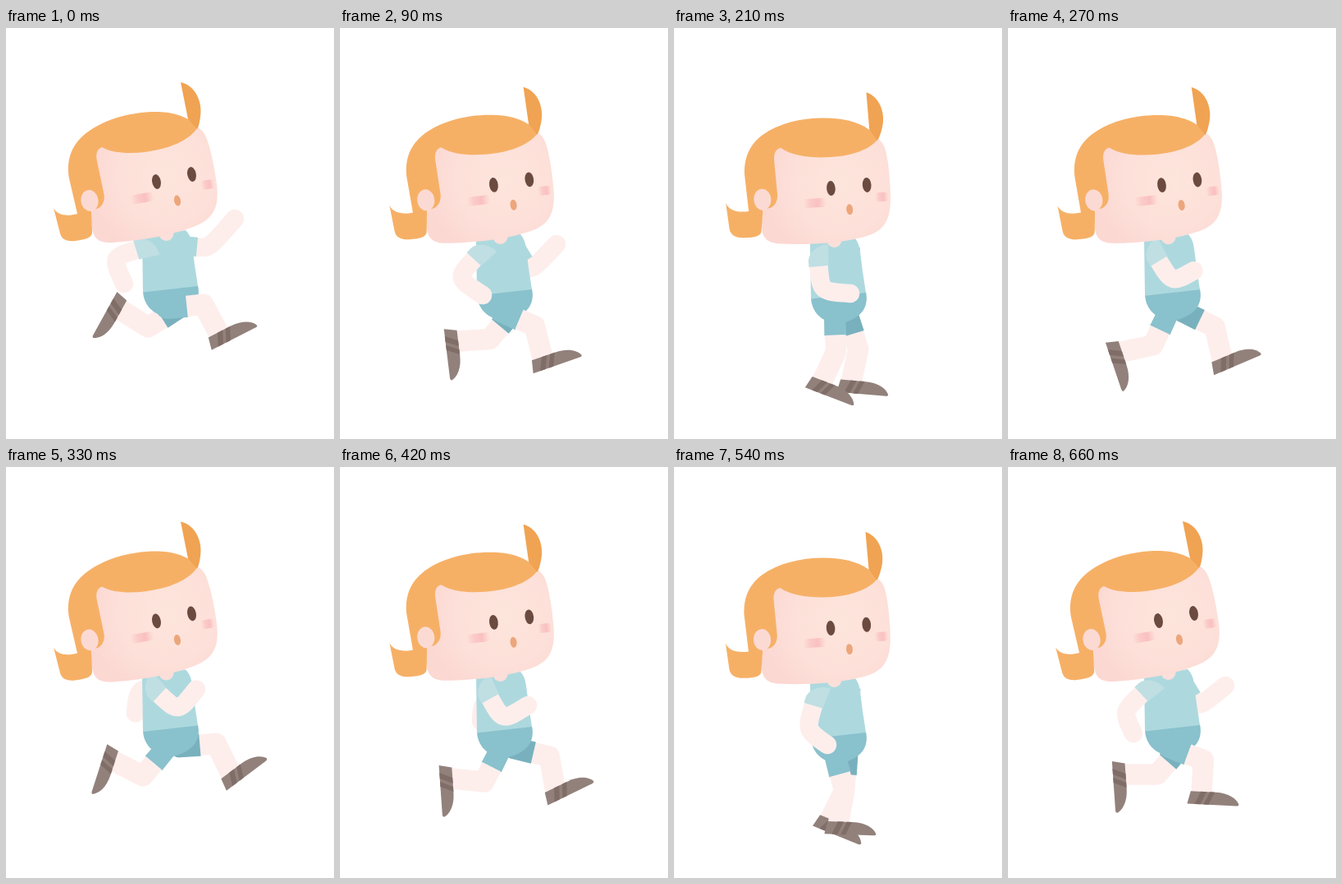
An HTML page for the animation above (0.69 s loop, 400 by 500 pixels).

```html
<!DOCTYPE html>
<html lang="en">
<head>
<meta charset="utf-8">
<title>Runner</title>
<style>
  html, body { margin: 0; width: 100%; height: 100%; overflow: hidden; background: #fff; }
  svg { display: block; width: 100vw; height: 100vh; }
  .limb { fill: none; stroke: #fdeeec; stroke-linejoin: round; }
  .leg { stroke-width: 25.5; }
  .arm { stroke-width: 22.5; stroke-linecap: round; }
</style>
</head>
<body>
<svg viewBox="0 0 400 500">
  <defs>
    <radialGradient id="skin" gradientUnits="userSpaceOnUse" cx="196" cy="180" r="96">
      <stop offset="0" stop-color="#fde5dc"/>
      <stop offset=".62" stop-color="#fde0d9"/>
      <stop offset="1" stop-color="#fcd8d3"/>
    </radialGradient>
    <linearGradient id="blush">
      <stop offset="0" stop-color="#fac3c3" stop-opacity="0"/>
      <stop offset=".3" stop-color="#fac3c3" stop-opacity=".75"/>
      <stop offset=".65" stop-color="#fac0c1"/>
      <stop offset="1" stop-color="#fac3c3" stop-opacity="0"/>
    </linearGradient>
    <g id="shoe">
      <path fill="#92817b" d="M-17 15L-13.500 -.5H17C33 -.5 43 6 46 13Q46 15 43 15Z"/>
      <path fill="#806d67" d="M-1 -.5H6L-1 15H-8ZM10 -.5H16L9 15H3Z"/>
    </g>
    <path id="cuff" d="M0 -13A13 13 0 0 0 0 13L25 13.500V-13.500Z"/>
  </defs>

  <g id="body">
    <path id="farArm" class="limb arm"/>
    <path id="farSleeve" fill="#add9de" d="M-6 -12H18V11.500H-6Z"/>

    <path id="farLeg" class="limb leg"/>
    <use id="farShoe" href="#shoe"/>
    <use id="farCuff" href="#cuff" fill="#78b1bd"/>

    <path fill="#89c1cd" d="M167 320L234 313C238 332 228 343 212 349C194 356 168 346 167 320Z"/>
    <path fill="#add9de" d="M166 253L219 246C225 252 226 258 227 264L230 288L234 314L167 321.500Z"/>
    <circle cx="195.500" cy="250" r="9" fill="#fbdfda"/>

    <use id="nearCuff" href="#cuff" fill="#89c1cd"/>
    <path id="nearLeg" class="limb leg"/>
    <use id="nearShoe" href="#shoe"/>

    <path id="nearArm" class="limb arm"/>
    <path id="nearSleeve" fill="#bfdfe3" d="M17 -12L-9 -14C-9 0 0 11 10 12H17Z"/>

    <g id="head">
      <path fill="url(#skin)" d="M104 235C105 256 112 262 130 261C160 259 200 253 228 242C250 234 261 222 257 190C254 168 250 150 246 138C243 128 238 122 232 120L106 140Z"/>
      <path fill="#f6b066" d="M234 120C220 106 200 102 183 102C150 102 115 112 93 132C77 147 74 165 77 183L87 226C73 230 62 227 58 219L66 250C68 258 76 260 84 259C100 257 106 254 105 247L104 222L113 219C119 215 121 208 119 200L111 162C109 153 111 147 117 145C135 155 165 153 190 147C210 142 228 132 234 120Z"/>
      <path fill="#f0a352" d="M213 66C232 70 240 92 237 108C236 115 235 120 233 123L222 111Z"/>
      <ellipse cx="102" cy="210" rx="10.500" ry="13" fill="#fcdad4" transform="rotate(-11 102 210)"/>
      <g fill="#6b4a40">
        <ellipse cx="183.500" cy="187" rx="5.300" ry="9" transform="rotate(-11 183.500 187)"/>
        <ellipse cx="226.500" cy="178" rx="5.300" ry="9" transform="rotate(-11 226.500 178)"/>
      </g>
      <ellipse cx="209" cy="210" rx="4" ry="6.500" fill="#eca67c" transform="rotate(-11 209 210)"/>
      <g fill="url(#blush)">
        <rect x="152" y="201.500" width="28" height="11" rx="4" transform="rotate(-10 166 207)"/>
        <rect x="238" y="185" width="16" height="11" rx="4" transform="rotate(-10 246 190)"/>
      </g>
    </g>
  </g>
</svg>
<script>
const LOOP = 690, STEP = 30;
const times = [0, 90, 210, 330, 420, 540, 660];

// One value per key time; angles in degrees, arm points relative to the shoulder.
const pose = {
  bob:  [0, 4, 8, .4, 2, 9, 0],
  tilt: [0, 3.2, 6.5, 0, 3.2, 6.2, 0],
  near: {
    thigh: [-6, 23, 88, 130, 117, 75, 20],
    shin:  [62, 76, 115, 207, 186, 100, 93],
    foot:  [-27, -19, 21, 108, 86, 2, 3],
    swing: [163, 133, 85, 43, 61, 107, 137],
    handX: [-31, -1, 40, 57, 54, 12, -22],
    handY: [46, 56, 50, 5, 23, 64, 59]
  },
  far: {
    thigh: [148, 130, 73, -5, 13, 95, 131],
    shin:  [212, 176, 102, 64, 80, 116, 180],
    foot:  [119, 83, 5, -37, -26, 22, 86],
    elbowX: [33, 17, 0, -54, -42, -5, 17],
    elbowY: [3, 28, 35, 3, 20, 35, 28],
    handX: [64, 49, 0, -57, -43, 6, 50],
    handY: [-33, -6, 45, 34, 42, 45, 1]
  }
};

const el = id => document.getElementById(id);
const count = times.length;
const wrap = i => (i + count) % count;
const gap = i => (times[wrap(i + 1)] - times[wrap(i)] + LOOP) % LOOP;
const rate = (v, i) => (v[wrap(i + 1)] - v[wrap(i)]) / gap(i);

// Monotone slope: flat at turning points.
function slope(v, i) {
  const a = rate(v, i - 1), b = rate(v, i);
  return a * b <= 0 ? 0 : 2 * a * b / (a + b);
}

function sample(v, t) {
  let i = count - 1;
  while (times[i] > t) i--;
  const h = gap(i), s = (t - times[i]) / h, r = 1 - s;
  return v[i] * r * r * (1 + 2 * s) + v[wrap(i + 1)] * s * s * (1 + 2 * r)
    + h * s * r * (slope(v, i) * r - slope(v, i + 1) * s);
}

function polar([x, y], angle, length) {
  const a = angle * Math.PI / 180;
  return [x + length * Math.cos(a), y + length * Math.sin(a)];
}

const place = (id, p, angle) =>
  el(id).setAttribute("transform", `translate(${p}) rotate(${angle})`);

function drawLeg(side, hip, get) {
  const thigh = get("thigh"), shin = get("shin");
  const knee = polar(hip, thigh, 45);
  const ankle = polar(knee, shin, 39);
  el(side + "Leg").setAttribute("d",
    `M${polar(hip, thigh, 24.5)}L${knee}L${polar(knee, shin, 41)}`);
  place(side + "Cuff", hip, thigh);
  place(side + "Shoe", ankle, get("foot"));
}

function drawArm(side, shoulder, elbow, get) {
  const angle = Math.atan2(elbow[1] - shoulder[1], elbow[0] - shoulder[0]) * 180 / Math.PI;
  const hand = [shoulder[0] + get("handX"), shoulder[1] + get("handY")];
  el(side + "Arm").setAttribute("d",
    `M${polar(shoulder, angle, 12)}L${polar(shoulder, angle, 17)}C${elbow} ${elbow} ${hand}`);
  place(side + "Sleeve", shoulder, angle);
}

function draw(t) {
  const near = key => sample(pose.near[key], t);
  const far = key => sample(pose.far[key], t);
  const nearShoulder = [175, 265], farShoulder = [215, 265];

  el("body").setAttribute("transform", `translate(0 ${sample(pose.bob, t)})`);
  el("head").setAttribute("transform", `rotate(${sample(pose.tilt, t)} 187 257)`);
  drawLeg("near", [196, 341], near);
  drawLeg("far", [211.5, 340], far);
  drawArm("near", nearShoulder, polar(nearShoulder, near("swing"), 48), near);
  drawArm("far", farShoulder,
    [farShoulder[0] + far("elbowX"), farShoulder[1] + far("elbowY")], far);
}

const start = performance.now();
function frame() {
  const t = (performance.now() - start) % LOOP;
  draw(Math.floor(t / STEP) * STEP);
  requestAnimationFrame(frame);
}
frame();
</script>
</body>
</html>
```
